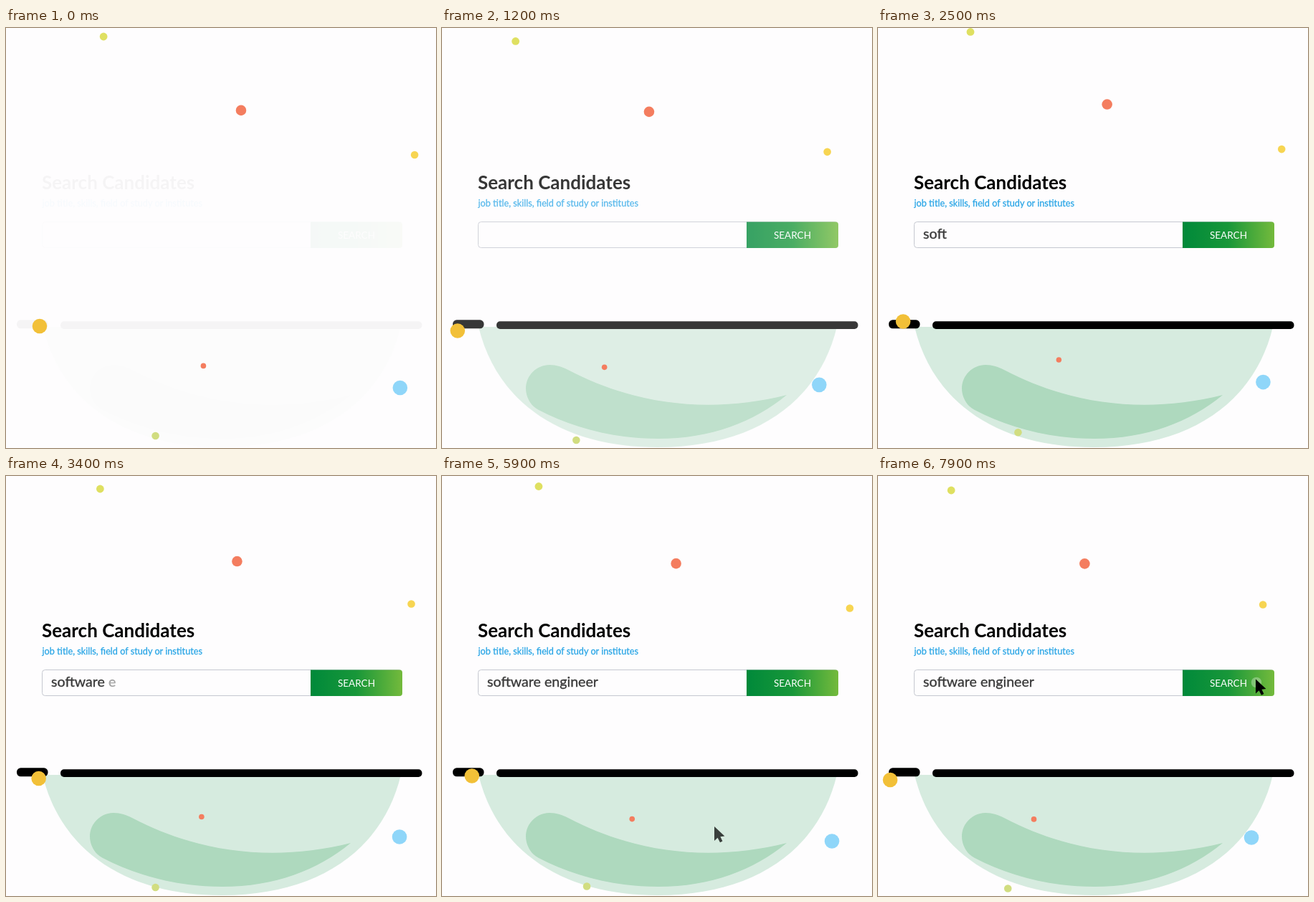
Recreate the animation shown at these times as an HTML page. Size 600x586 px, loop 8 s.

```html
<!DOCTYPE html>
<html lang="en">
<head>
<meta charset="utf-8">
<title>Search Candidates</title>
<style>
  html, body { margin: 0; width: 100%; height: 100%; overflow: hidden; background: #fefdfe; }
  svg { display: block; width: 100vw; height: 100vh; }
  text { font-family: Lato, "Open Sans", sans-serif; }
</style>
</head>
<body>
<svg viewBox="0 0 600 586" preserveAspectRatio="none">
  <defs>
    <linearGradient id="green">
      <stop offset="0" stop-color="#00893a"/>
      <stop offset=".5" stop-color="#189739"/>
      <stop offset="1" stop-color="#74ba3c"/>
    </linearGradient>
  </defs>
  <g id="scene">
    <path fill="#d6ebdf" d="M51 417C76 521 165 585 301 585S526 521 551 417Z"/>
    <path fill="#aed9be" d="M150 470C160 470 168 473 176 477C275 529 380 537 481 512C435 550 375 573 302 573C235 573 180 556 135 533C123 527 117 514 117 503C117 485 132 470 150 470Z"/>
    <rect x="15" y="407.3" width="43.5" height="12" rx="5.5"/>
    <rect x="76" y="409.3" width="504.5" height="10.6" rx="5"/>
    <text x="50" y="225" font-size="26" font-weight="700">Search Candidates</text>
    <text x="50.5" y="248.5" font-size="12.7" fill="#2ba6e6" stroke="#2ba6e6" stroke-width=".3">job title, skills, field of study or institutes</text>
    <rect x="50.5" y="270.5" width="502" height="36" rx="4" fill="#fefdfe" stroke="#c5c8d0"/>
    <path fill="url(#green)" d="M425 270.5H549a4 4 0 0 1 4 4V303a4 4 0 0 1 -4 4H425Z"/>
    <text x="463" y="294.3" font-size="13.5" fill="#fff">SEARCH</text>
  </g>
  <text id="query" x="63" y="294" font-size="19.6" fill="#3a3a3a" stroke="#3a3a3a" stroke-width=".35"></text>
  <circle id="ripple" cx="528" cy="288" fill="#fff"/>
  <path id="cursor" d="M0 0V20L4.6 15.8L8 22.2L11.4 20.6L8.4 14.2L14.4 13.4Z"/>
  <g id="dots"></g>
</svg>
<script>
const LOOP = 8000, STEP = 100, DRIFT = 6.3;
const NS = "http://www.w3.org/2000/svg";
const byId = id => document.getElementById(id);
const clamp = v => Math.max(0, Math.min(1, v));
const ramp = (t, from, to) => clamp((t - from) / (to - from));
const ease = p => p * p * (3 - 2 * p);
const wave = (t, period, degrees = 0) => Math.cos(2 * Math.PI * t / period + degrees * Math.PI / 180);

function add(parent, name, attrs) {
  const el = parent.appendChild(document.createElementNS(NS, name));
  set(el, attrs);
  return el;
}
function set(el, attrs) {
  for (const key in attrs) el.setAttribute(key, attrs[key]);
}

// Smooth periodic curve through [time, value] keys.
function bob(keys) {
  const n = keys.length;
  const key = i => {
    const turn = Math.floor(i / n), [time, value] = keys[i - turn * n];
    return [time + turn * DRIFT, value];
  };
  const slope = i => {
    const [a, b] = [key(i - 1), key(i + 1)];
    return (b[1] - a[1]) / (b[0] - a[0]);
  };
  return t => {
    t %= DRIFT;
    let i = 0;
    while (key(i + 1)[0] <= t) i++;
    const [t0, v0] = key(i), [t1, v1] = key(i + 1);
    const span = t1 - t0, p = (t - t0) / span, q = 1 - p;
    return v0 * q * q * (1 + 2 * p) + v1 * p * p * (3 - 2 * p)
      + span * p * q * (slope(i) * q - slope(i + 1) * p);
  };
}

const steady = t => -8.4 * wave(t - 0.56, DRIFT / 3);
const left = bob([[0, 0], [.25, -1], [.8, 2.5], [1.6, 8], [2.6, -7], [3.4, 6], [3.7, 7.5], [4.8, -3], [5.9, 2.5]]);
const right = bob([[0, 1.5], [.75, -8], [1.6, 4], [1.85, 5], [2.7, -8], [3.4, 3], [3.8, 7], [4.8, -6], [5.9, 9]]);
const low = bob([[0, -1], [.4, -3], [.8, -2], [1.35, 7], [1.6, 5.5], [2.6, -6], [3.4, 4], [3.7, 7], [4.8, -4.5], [5.9, 2.5]]);

const dots = [
  { x: 119, y: 12, r: 5.4, sway: 18, lead: 18, bob: left, fill: "#dfe061" },
  { x: 308, y: 114, r: 7.3, sway: 21, lead: 18, bob: steady, fill: "#f47d5f" },
  { x: 553.5, y: 175.5, r: 5.3, sway: 17.5, lead: 18, bob: right, fill: "#f7d552" },
  { x: 32, y: 416, r: 10.3, sway: 15, lead: -4, bob: left, fill: "#f2c038" },
  { x: 246.5, y: 470.5, r: 3.8, sway: 29, lead: -4, bob: steady, fill: "#f47d5f" },
  { x: 535.5, y: 500.5, r: 10.3, sway: 14.5, lead: -8, bob: right, fill: "#8fd6f9" },
  { x: 195, y: 570, r: 5.3, sway: 14, lead: -14, bob: low, fill: "#d1dd80" }
];
for (const dot of dots) dot.el = add(byId("dots"), "circle", { r: dot.r, fill: dot.fill });

const letters = [..."software engineer"].map(char => {
  const el = add(byId("query"), "tspan", {});
  el.textContent = char;
  return el;
});

function draw(t) {
  set(byId("scene"), { opacity: clamp(0.03 + 0.625 * t) });
  for (const { el, x, y, sway, lead, bob } of dots)
    set(el, { cx: x + sway * wave(t, DRIFT / 2, lead), cy: y + bob(t) });

  letters.forEach((el, i) => {
    const start = 1.98 + 0.15 * i, alpha = ramp(t, start, start + 0.17);
    set(el, { "fill-opacity": alpha, "stroke-opacity": alpha });
  });

  const move = ease(ramp(t, 6, 7.3));
  set(byId("cursor"), {
    transform: `translate(${380 + 147 * move} ${489 - 205.5 * move})`,
    opacity: ramp(t, 5.6, 6.01)
  });
  const press = ramp(t, 7.6, 8);
  set(byId("ripple"), { r: 2 + 7 * press, opacity: press > 0 ? 0.5 - 0.25 * press : 0 });
}

const begin = performance.now();
function tick() {
  const ms = (performance.now() - begin) % LOOP;
  draw(Math.floor(ms / STEP) * STEP / 1000);
  requestAnimationFrame(tick);
}
tick();
</script>
</body>
</html>
```
